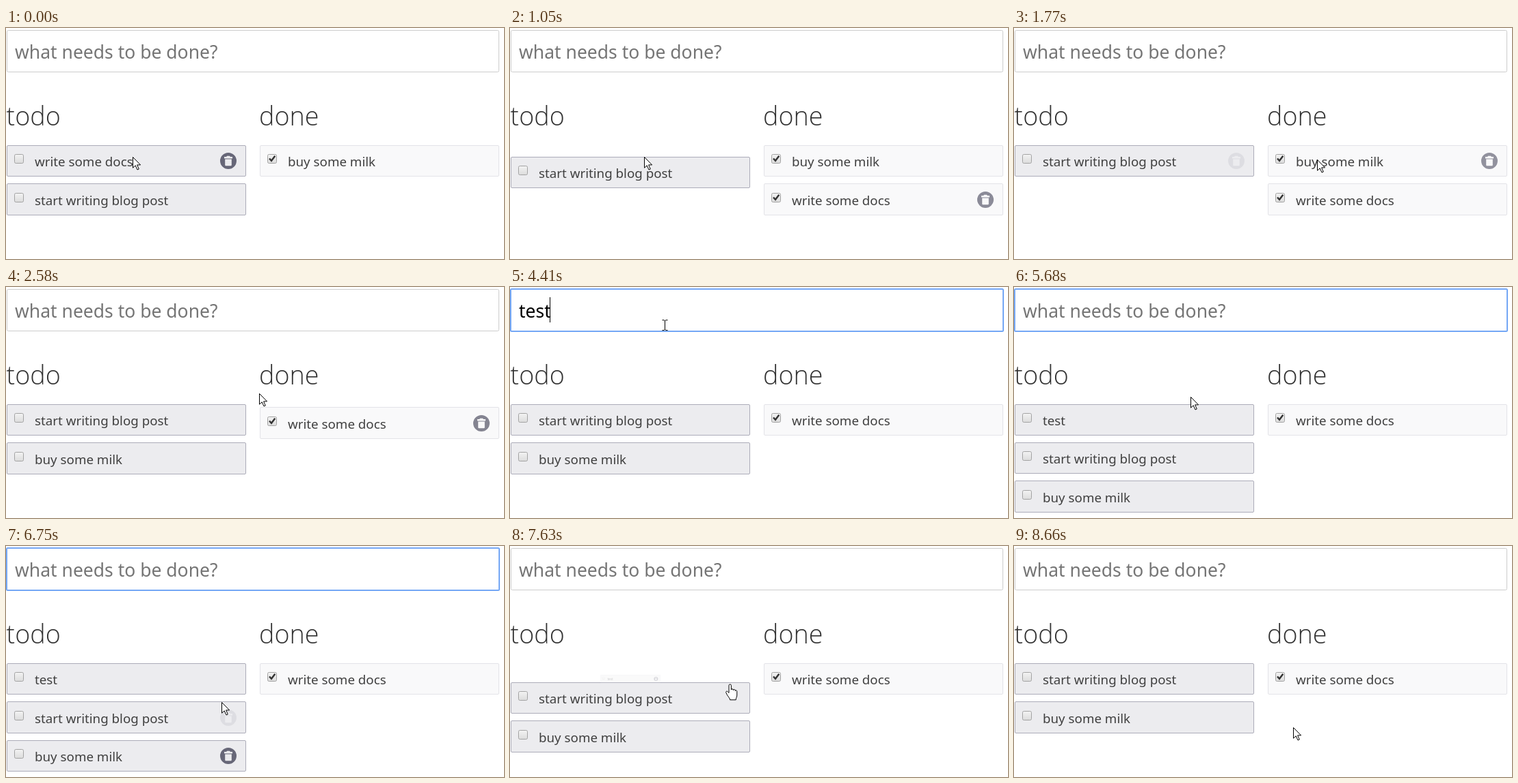
An HTML page that plays this animation: 728x339 px, repeating every 9160 ms.

```html
<!DOCTYPE html>
<html lang="en">
<head>
<meta charset="utf-8">
<title>Todo list</title>
<style>
  html, body { margin: 0; width: 100%; height: 100%; overflow: hidden; background: #fff; }
  svg { display: block; width: 100vw; height: 100vh; }
  text { font-family: "Noto Sans", "Open Sans", sans-serif; white-space: pre; }
  .heading { font: 300 37.7px "Open Sans", "Noto Sans", sans-serif; fill: #333; }
  .field { font-size: 26.5px; }
  .label { font-size: 18.75px; fill: #404040; }
  .todo .card { fill: hsl(240 8% 93%); stroke: hsl(240 8% 70%); }
  .done .card { fill: hsl(240 8% 98%); stroke: hsl(240 8% 90%); }
  .check { fill: url(#bevel); stroke: #a3a3a3; }
  .pressed .check { fill: #cfcfcf; stroke: #888; }
  .tick { fill: none; stroke: #333; stroke-width: 2.4; }
  .bin { fill: #676778; fill-rule: evenodd; }
  .pointer path { fill: #fff; stroke: #000; stroke-linejoin: round; }
</style>
</head>
<body>
<svg viewBox="0 0 728 339" preserveAspectRatio="none">
  <defs>
    <linearGradient id="bevel" x2="0" y2="1">
      <stop stop-color="#f3f3f3"/><stop offset="1" stop-color="#dcdcdc"/>
    </linearGradient>
  </defs>
  <rect id="border" x="1.5" y="3.5" width="719" height="61" rx="2" fill="#fff" stroke="#ccc"/>
  <rect id="ring" x="1" y="3" width="720" height="62" rx="1.5" fill="none" stroke="#74a7f5" stroke-width="2"/>
  <text id="hint" class="field" x="13" y="45" fill="#757575">what needs to be done?</text>
  <text id="typed" class="field" x="13" y="45"></text>
  <rect id="caret" y="15" width="1" height="37"/>
  <text class="heading" x=".6" y="142.5">todo</text>
  <text class="heading" x="370" y="142.5">done</text>
  <g id="list"></g>
  <circle id="halo" r="15" fill="#ff0" fill-opacity=".47"/>
  <g id="pointer" class="pointer">
    <path id="arrow" d="M.5 .5V16.2L4.2 12.8 7 19 9.3 18 6.6 11.9H11.6Z"/>
    <path id="hand" transform="translate(-7 -1)" d="M5 13.5V2.7a1.7 1.7 0 0 1 3.4 0V9c0-1.6 3-1.6 3 0v.6c0-1.5 2.9-1.4 2.9.2v.8c0-1.3 2.5-1.1 2.5.7V17c0 3-1.6 3.6-1.6 6.8H6.6c0-2.6-2.5-4.2-4-7L.8 13.2c-.8-1.8 1.4-2.8 2.6-1.2Z"/>
    <path id="beam" style="fill:none" d="M-3.5-7.5H-1L.5-6.5 2-7.5H4.5M.5-6.5V6.5M-3.5 7.5H-1L.5 6.5 2 7.5H4.5"/>
  </g>
</svg>
<script>
const LOOP = 9160, TICK = 62, FADE = 200;
const FOCUS = 3220, TYPE = 3970, KEY_GAP = 146, ENTER = 4970, BLUR = 7320;
const ADD = 4920, REMOVE = 7442;
const bursts = [0, 800, 2130, 3100, ENTER, BLUR];  // the picture refreshes every TICK from each of these
const presses = [[540, 800], [1950, 2130], [FOCUS, 3340], [BLUR, 7440]];
const stops = [  // time, x, y of the pointer
  [845, 185, 189], [1770, 443, 193], [2350, 443, 193], [2580, 370, 156], [3100, 226, 56],
  [5200, 226, 56], [5680, 258, 161], [6300, 300, 292], [7000, 322, 203], [7650, 322, 203],
  [8250, 543, 262], [8660, 408, 266]
];

const $ = id => document.getElementById(id);
const clamp = v => Math.min(1, Math.max(0, v));
const lerp = (a, b, k) => a + (b - a) * k;
const cubicOut = p => 1 - (1 - p) ** 3;
const quintOut = p => 1 - (1 - p) ** 5;
const cubicInOut = p => p < .5 ? 4 * p ** 3 : 1 - 4 * (1 - p) ** 3;
const show = (node, on) => node.style.display = on ? '' : 'none';

const face = (kind, text) => `<g class="${kind}">
  <rect class="card" x=".5" y=".5" width="349" rx="1.5"/>
  <g class="content">
    <rect class="check" x="11.5" y="13.5" width="13" height="13" rx="2"/>
    ${kind === 'done' ? '<path class="tick" d="M14 19.5 17 22.8 22.3 15.8"/>' : ''}
    <text class="label" x="41" y="31">${text}</text>
  </g></g>`;
const bin = `<g class="content"><path class="bin" transform="translate(309.6 8.6) scale(1.2)"
  d="M12 2a10 10 0 0 1 0 20a10 10 0 0 1 0-20M17 7H14.5L13.5 6H10.5L9.5 7H7V9H17Z
  M9 18H15A1 1 0 0 0 16 17V10H8V17A1 1 0 0 0 9 18Z"/></g>`;

function makeItem(text, column = 0) {
  const node = document.createElementNS('http://www.w3.org/2000/svg', 'g');
  node.innerHTML = face('todo', text) + face('done', text) + bin;
  $('list').append(node);
  const [todo, done, icon] = node.children;
  return { node, todo, done, icon, column, moves: [], born: -LOOP, gone: 2 * LOOP };
}

const blog = makeItem('start writing blog post');
const milk = makeItem('buy some milk', 1);
const docs = makeItem('write some docs');
const test = makeItem('test');
const items = [blog, milk, docs, test];
let order = [];

// Stores each item's new slot whenever the list changes
function arrange(start, list) {
  order = list;
  const rows = [0, 0];
  for (const item of list) {
    const slot = { start, done: item.column, x: 1 + 370 * item.column, y: 172 + 56.4 * rows[item.column]++ };
    const last = item.moves.at(-1);
    if (!last || last.x !== slot.x || last.y !== slot.y) item.moves.push(slot);
  }
}
const without = item => order.filter(other => other !== item);
function toggle(start, item) {
  item.column = 1 - item.column;
  arrange(start, [...without(item), item]);
}

arrange(0, [docs, blog, milk]);
toggle(746, docs);
toggle(2042, milk);
test.born = ADD;
arrange(ADD, [test, ...order]);
test.gone = REMOVE + 43;
arrange(REMOVE, without(test));

function pose({ moves }, t) {
  let { x, y, done } = moves[0];
  for (const next of moves.slice(1)) {
    const distance = Math.hypot(next.x - x, next.y - y);
    const duration = next.done !== done ? Math.sqrt(distance * 200) : Math.sqrt(distance) * 120;
    const k = cubicOut(clamp((t - next.start) / duration));
    if (!k) break;
    [x, y, done] = [lerp(x, next.x, k), lerp(y, next.y, k), lerp(done, next.done, k)];
  }
  return { x, y, done };
}

function pointerAt(t) {
  let [since, x, y] = stops[0];
  for (const [time, nextX, nextY] of stops) {
    const k = cubicInOut(clamp((t - since) / (time - since || 1)));
    [since, x, y] = [time, lerp(x, nextX, k), lerp(y, nextY, k)];
  }
  return { x: Math.round(x), y: Math.round(y) };
}

function isOver(item, t) {
  const p = pointerAt(t), { x, y } = pose(item, t), margin = 10;
  return p.x > x && p.x < x + 350 && p.y > y - margin && p.y < y + 46 + margin;
}

// Hovering takes effect late and fades linearly: a moving average of the recent past
function hoverAmount(item, t, samples = 20) {
  let sum = 0;
  for (let i = 0; i < samples; i++) sum += isOver(item, t - FADE - FADE * i / samples);
  return sum / samples;
}

function drawItem(item, t, pressing) {
  const { x, y, done } = pose(item, t);
  const size = quintOut(clamp((t - item.born) / 600)) * (1 - quintOut(clamp((t - item.gone) / 600)));
  const top = Math.round(y), snap = Math.round(y + .4) - top;
  show(item.node, size > 0);
  item.node.setAttribute('transform',
    `translate(${Math.round(x) + 175} ${top + 23}) scale(${size}) translate(-175 -23)`);
  item.node.style.opacity = size;
  item.todo.style.opacity = 1 - done;
  item.done.style.opacity = done;
  item.icon.style.opacity = hoverAmount(item, t);
  for (const card of item.node.querySelectorAll('.card')) card.setAttribute('height', 45 + snap);
  for (const part of item.node.querySelectorAll('.content')) part.setAttribute('transform', `translate(0 ${snap})`);
  item.node.classList.toggle('pressed', pressing && isOver(item, t));
}

function drawField(t) {
  const focused = t >= FOCUS && t < BLUR;
  const keys = t >= TYPE && t < ENTER ? 1 + Math.floor((t - TYPE) / KEY_GAP) : 0;
  const text = 'test'.slice(0, keys);
  const blink = Math.floor((t - (t < ENTER ? FOCUS : ENTER)) / 500) % 2 === 0;
  show($('border'), !focused);
  show($('ring'), focused);
  show($('hint'), !text);
  $('typed').textContent = text;
  show($('caret'), focused && (text || blink));
  $('caret').setAttribute('x', 13 + (text ? Math.floor($('typed').getComputedTextLength() - 1) : 0));
}

function drawPointer(t, pressing) {
  const { x, y } = pointerAt(t);
  const shape = y < 65 ? 'beam' : Math.hypot(x - 325, y - 195) < 13 ? 'hand' : 'arrow';
  for (const name of ['arrow', 'hand', 'beam']) show($(name), name === shape);
  for (const id of ['pointer', 'halo']) $(id).setAttribute('transform', `translate(${x} ${y})`);
  show($('halo'), pressing);
}

const begin = performance.now();
function draw() {
  const t = (performance.now() - begin) % LOOP;
  const burst = Math.max(...bursts.filter(start => start <= t));
  const held = burst + Math.floor((t - burst) / TICK) * TICK;
  const pressing = presses.some(([from, to]) => t >= from && t < to);
  for (const item of items) drawItem(item, held, pressing);
  drawField(t);
  drawPointer(held, pressing);
  requestAnimationFrame(draw);
}
draw();
</script>
</body>
</html>
```
